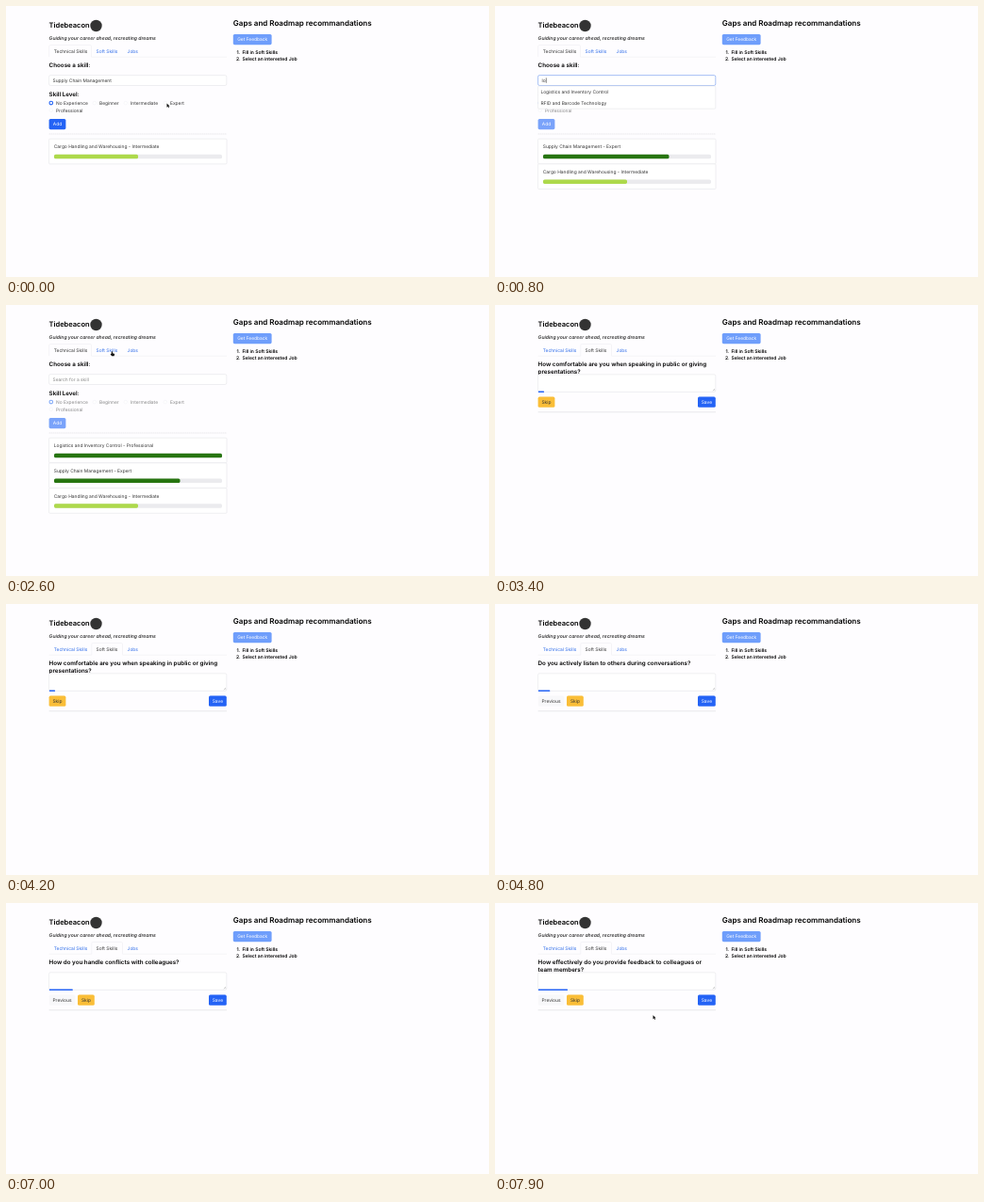
Recreate the animation shown at these times as an HTML page. Size 512 by 288 pixels, loop 8 s.

```html
<!DOCTYPE html>
<html lang="en">
<head>
<meta charset="utf-8">
<title>Skill form</title>
<style>
  html, body { margin: 0; height: 100%; overflow: hidden; background: #fefdff; }
  svg { display: block; width: 100vw; height: 100vh; }
  text { font: 4.9px Inter, sans-serif; fill: #333; text-rendering: geometricPrecision; white-space: pre; }
  .head { font-size: 6.25px; font-weight: 600; fill: #000; }
  .title { font-size: 8px; font-weight: 600; fill: #000; }
  .brand { font-size: 7.5px; font-weight: 600; fill: #000; }
  .motto { font-size: 5.07px; font-weight: 600; font-style: italic; }
  .step { font-size: 5px; font-weight: 600; fill: #000; }
  .link { fill: #2d6be8; }
  .muted { fill: #888; }
  .light { fill: #fff; }
</style>
</head>
<body>
<svg id="stage" viewBox="0 0 512 288"></svg>
<script>
const LOOP = 8000, STEP = 100;
const BLUE = '#2463f5', LINE = '#e4e4e8';
const stage = document.getElementById('stage');

const SKILLS = [
  { at: -1000, name: 'Cargo Handling and Warehousing - Intermediate', level: 0.5, color: '#add94b' },
  { at: 400, name: 'Supply Chain Management - Expert', level: 0.75, color: '#277510' },
  { at: 1600, name: 'Logistics and Inventory Control - Professional', level: 1, color: '#277510' }
];
const LEVELS = [['No Experience', 53, 104.8], ['Beginner', 99, 104.8], ['Intermediate', 132, 104.8],
                ['Expert', 174, 104.8], ['Professional', 53, 112.5]];
const FIELD = [[0, 'Supply Chain Management'], [400, ''], [700, 'l'], [800, 'lo'],
               [1000, 'Logistics and Inventory Control'], [1600, '']];
const CHOICE = [[0, 0], [100, 3], [400, 0], [1300, 4], [1600, 0]];
const QUESTIONS = [
  [2800, 'How comfortable are you when speaking in public or giving', 'presentations?'],
  [4400, 'Do you actively listen to others during conversations?'],
  [5500, 'How well do you express your ideas and thoughts in writing?'],
  [6500, 'How do you handle conflicts with colleagues?'],
  [7300, 'How effectively do you provide feedback to colleagues or', 'team members?']
];
// Pointer paths: time, x, y
const PATHS = [
  [[0, 170.5, 103.5], [100, 168, 103], [300, 55, 125], [400, 55, 125], [500, 75, 79], [600, 75, 79]],
  [[900, 85, 88], [1000, 85, 91], [1200, 49, 110], [1300, 48, 111], [1500, 55, 125],
   [1700, 55, 125], [2300, 108, 60], [2500, 112.5, 49.5], [2800, 112.5, 49.5], [3200, 150, 275]],
  [[7500, 200, 106], [7800, 168, 119], [8000, 167, 119.5]]
];

const clamp = v => Math.max(0, Math.min(1, v));
const ease = v => 1 - (1 - clamp(v)) ** 3;
const latest = (keys, t) => keys.filter(k => k[0] <= t).pop();

const text = (s, x, y, cls = '', extra = '') => `<text x="${x}" y="${y}" class="${cls}" ${extra}>${s}</text>`;
const box = (x, y, w, h, fill, stroke = 'none', r = 1.6, extra = '') =>
  `<rect x="${x}" y="${y}" width="${w}" height="${h}" rx="${r}" fill="${fill}" stroke="${stroke}" stroke-width=".6" ${extra}/>`;
const path = (d, color = LINE, extra = '') => `<path d="${d}" fill="none" stroke="${color}" stroke-width=".6" ${extra}/>`;
const button = (label, x, y, w, fill, cls = '') =>
  box(x, y, w, 11.2, fill) + text(label, x + w / 2, y + 7.4, cls, 'text-anchor="middle"');

function page(soft) {
  const [left, right] = soft ? [90.8, 123.5] : [45.6, 90.5];
  return text('Tidebeacon', 45.6, 23.4, 'brand')
    + '<circle cx="95.5" cy="21" r="6.2" fill="#333"/>'
    + text('Guiding your career ahead, recreating dreams', 45.6, 35.6, 'motto')
    + path(`M45.6 54.2H${left}V43q0-1.5 1.5-1.5H${right - 1.5}q1.5 0 1.5 1.5V54.2H234`, '#eeeef1')
    + text('Technical Skills', 50.8, 49.7, soft ? 'link' : '')
    + text('Soft Skills', 95.6, 49.7, soft ? '' : 'link')
    + text('Jobs', 128.6, 49.7, 'link')
    + text('Gaps and Roadmap recommandations', 240.8, 20.8, 'title')
    + button('Get Feedback', 240.8, 30, 40.8, '#6f9efb', 'light')
    + text('1.', 244.4, 51, 'step') + text('Fill in Soft Skills', 250.4, 51, 'step')
    + text('2.', 244, 58.2, 'step') + text('Select an interested Job', 250.4, 58.2, 'step');
}

function radios(t, enabled) {
  const chosen = latest(CHOICE, t)[1];
  return LEVELS.map(([label, x, y], i) => {
    const on = i === chosen;
    const color = on ? (enabled ? BLUE : '#84abf8') : '#ededf1';
    return `<circle cx="${x - 5.2}" cy="${y - 1.7}" r="1.8" fill="#fff" stroke="${color}" stroke-width="${on ? 1.1 : 0.4}"/>`
      + text(label, x, y, enabled ? '' : 'muted');
  }).join('');
}

function cards(t) {
  const pitch = 26.7;
  let top = 141.2, out = '';
  for (const { at, name, level, color } of [...SKILLS].reverse()) {
    if (t < at) continue;
    const grow = ease((t - at) / 450);
    out += `<g opacity="${grow}">` + box(45.6, top, 188.4, pitch, '#fff', LINE, 1)
      + text(name, 50.8, top + 9.9)
      + box(51, top + 16.6, 178, 4.5, '#ebebee')
      + box(51, top + 16.6, 178 * level, 4.5, color) + '</g>';
    top += pitch * grow;
  }
  return out;
}

function technical(t) {
  const value = latest(FIELD, t)[1];
  const typing = t >= 700 && t < 1000;
  const focused = t >= 600 && t < 1000;
  const enabled = value.length > 2;
  let out = text('Choose a skill:', 45.6, 65, 'head')
    + box(45.6, 73.6, 188.2, 10.9, '#fff', focused ? '#6d98ee' : LINE)
    + text(value || 'Search for a skill', 49.5, 80.8, value ? '' : 'muted')
    + text('Skill Level:', 45.6, 95.8, 'head')
    + radios(t, enabled)
    + button('Add', 45.6, 120, 17.8, enabled ? BLUE : '#7aa3fa', 'light')
    + path('M45.6 136H234', '#d9d9de', 'stroke-dasharray="1.5 .5"')
    + cards(t);
  if (typing) {
    out += box(45.6, 85, 188.2, 24.2, '#fff', LINE, 1)
      + text('Logistics and Inventory Control', 48.4, 92.8)
      + text('RFID and Barcode Technology', 48.4, 104.7)
      + path('M54.3 76.4v5.4', '#333');
  }
  return out;
}

function softSkills(t) {
  const question = latest(QUESTIONS, t);
  const index = QUESTIONS.indexOf(question);
  const progress = 6.25 * (index + ease((t - question[0]) / 400));
  return text(question[1], 45.6, 65, 'head') + text(question[2] || '', 45.6, 73, 'head')
    + box(45.6, 73.8, 188.2, 18.6, '#fff', LINE)
    + path('M230.8 91.2l2.2-2.2M232 91.2l1-1', '#999', 'opacity=".7"')
    + box(45.8, 91.6, progress, 1.4, BLUE, 'none', 0.4)
    + (index ? button('Previous', 45.8, 97.6, 27.4, '#f8f8fa') : '')
    + button('Skip', index ? 76 : 45.6, 97.6, 17.8, '#fabe38')
    + button('Save', 215, 97.6, 18.8, BLUE, 'light')
    + path('M45.6 113.8H234', '#d9d9de');
}

function pointer(t) {
  const keys = PATHS.find(p => t >= p[0][0] && t <= p[p.length - 1][0]);
  if (!keys) return '';
  const next = Math.max(1, keys.findIndex(k => k[0] >= t));
  const [t0, x0, y0] = keys[next - 1], [t1, x1, y1] = keys[next];
  const p = (t - t0) / (t1 - t0);
  const x = x0 + (x1 - x0) * p, y = y0 + (y1 - y0) * p;
  const hand = t >= 2500 && t <= 2800;
  const shape = hand
    ? 'M-.5 0q.6-.6 1 0v1.8l1.7.4q.5.2.4.8l-.5 1.8h-2.5l-1.5-2q0-.7.9-.2z'
    : 'M0 0v4.2l1-.9.6 1.4.8-.3-.6-1.4h1.3z';
  return `<path transform="translate(${x} ${y})" d="${shape}" fill="#111" stroke="#fff" stroke-width=".4" paint-order="stroke"/>`;
}

function draw(now) {
  const t = Math.floor(now % LOOP / STEP) * STEP;
  const soft = t >= QUESTIONS[0][0];
  stage.innerHTML = page(soft) + (soft ? softSkills(t) : technical(t)) + pointer(t);
  requestAnimationFrame(draw);
}
draw(0);
</script>
</body>
</html>
```
